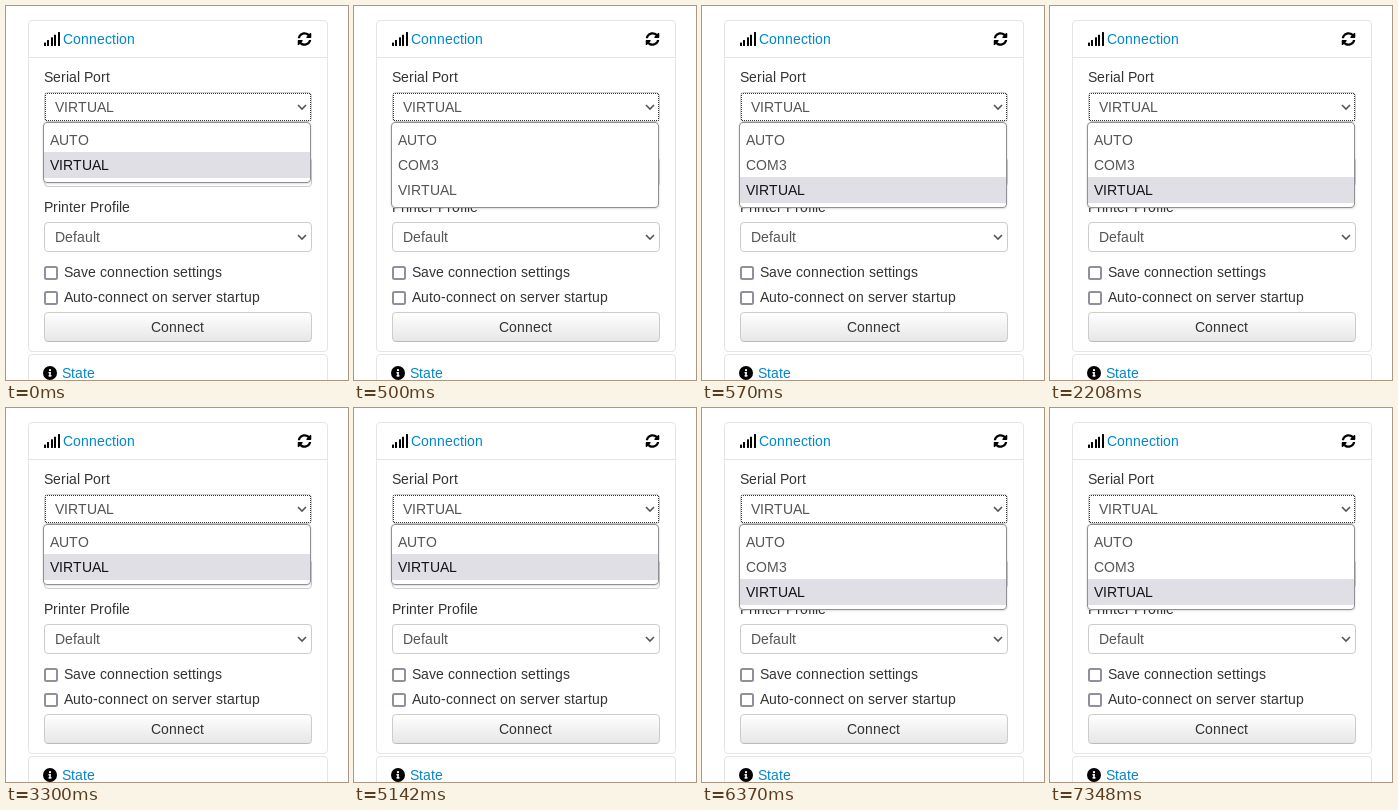
An HTML page with a canvas that plays this animation: 342x374 px, repeating every 8000 ms.

```html
<!DOCTYPE html>
<html lang="en">
<head>
<meta charset="utf-8">
<title>Connection panel</title>
<style>
  html, body { margin: 0; width: 100%; height: 100%; overflow: hidden; background: #fff; }
  canvas { display: block; width: 342px; height: 374px; }
</style>
</head>
<body>
<canvas id="stage"></canvas>
<script>
const W = 342, H = 374, LOOP = 8000;
const canvas = document.getElementById('stage');
const ctx = canvas.getContext('2d', { alpha: false });
const ratio = window.devicePixelRatio || 1;
canvas.width = W * ratio;
canvas.height = H * ratio;

const SHORT = ['AUTO', 'VIRTUAL'];
const LONG = ['AUTO', 'COM3', 'VIRTUAL'];
const STATES = [
  { from: 0, ports: SHORT, active: 1 },
  { from: 500, ports: LONG, active: -1 },
  { from: 570, ports: LONG, active: 2 },
  { from: 3300, ports: SHORT, active: 1 },
  { from: 6370, ports: LONG, active: 2 }
];

// Half of the refresh icon on a 512 unit grid; the other half is turned by 180 degrees.
const ARROW = new Path2D('M371 133C339 104 299 88 256 88C178 88 112 141 93 215C92 220 87 224 81 224' +
  'H24C17 224 11 217 12 210C34 95 135 8 256 8C322 8 383 34 427 77L463 41C478 26 504 37 504 58' +
  'V192C504 205 493 216 480 216H346C325 216 314 190 329 175Z');

const advance = ch => Math.round(ctx.measureText(ch).width);

// Hinted text: every glyph advances by a whole number of pixels.
function text(str, x, y, color = '#333') {
  ctx.fillStyle = color;
  for (const ch of str) {
    ctx.fillText(ch, x, y);
    x += advance(ch);
  }
}

function centeredText(str, x, y) {
  const width = [...str].reduce((sum, ch) => sum + advance(ch), 0);
  text(str, Math.round(x - width / 2), y);
}

function box(x, y, w, h, r, fill, stroke, line = 1) {
  const half = line / 2;
  ctx.beginPath();
  ctx.roundRect(x + half, y + half, w - line, h - line, r - half);
  ctx.fillStyle = fill;
  ctx.fill();
  ctx.strokeStyle = stroke;
  ctx.lineWidth = line;
  ctx.stroke();
}

function select(y, label, value) {
  text(label, 38, y - 10);
  box(38, y, 268, 30, 4, '#fff', '#ccc');
  text(value, 49, y + 20, '#555');
  ctx.beginPath();
  ctx.moveTo(292, y + 13);
  ctx.lineTo(296, y + 17);
  ctx.lineTo(300, y + 13);
  ctx.strokeStyle = '#555';
  ctx.lineWidth = 1.6;
  ctx.stroke();
}

function focusRing(y) {
  ctx.setLineDash([1, 1]);
  ctx.lineDashOffset = 0.5;
  ctx.strokeStyle = '#333';
  ctx.lineWidth = 1;
  ctx.strokeRect(39.5, y + 1.5, 265, 27);
  ctx.setLineDash([]);
}

function checkbox(y, label) {
  box(38, y, 14, 14, 2.5, '#fff', '#8f8f9d', 2);
  text(label, 58, y + 11);
}

function button(y, label) {
  const face = ctx.createLinearGradient(0, y, 0, y + 30);
  face.addColorStop(0, '#fff');
  face.addColorStop(1, '#e6e6e6');
  const edge = ctx.createLinearGradient(0, y, 0, y + 30);
  edge.addColorStop(0, '#ccc');
  edge.addColorStop(0.93, '#ccc');
  edge.addColorStop(1, '#b3b3b3');
  box(38, y, 268, 30, 4, face, edge);
  centeredText(label, 171.5, y + 20);
}

function signalIcon(x, bottom) {
  ctx.fillStyle = '#000';
  ctx.beginPath();
  for (let i = 0; i < 5; i++) {
    const h = 3.5 + i * 2.625;
    ctx.roundRect(Math.round(x + 0.66 + i * 3.5), bottom - h, 2, h, 0.4);
  }
  ctx.fill();
}

function onIconGrid(x, y, draw) {
  ctx.save();
  ctx.translate(x, y);
  ctx.scale(14 / 512, 14 / 512);
  draw();
  ctx.restore();
}

function refreshIcon(x, y) {
  onIconGrid(x, y, () => {
    ctx.fillStyle = '#000';
    ctx.fill(ARROW);
    ctx.translate(512, 512);
    ctx.rotate(Math.PI);
    ctx.fill(ARROW);
  });
}

function infoIcon(x, y) {
  onIconGrid(x, y, () => {
    const disc = (cy, r, color) => {
      ctx.fillStyle = color;
      ctx.beginPath();
      ctx.arc(256, cy, r, 0, Math.PI * 2);
      ctx.fill();
    };
    disc(256, 256, '#000');
    disc(152, 42, '#fff');
    ctx.fillRect(200, 224, 84, 48);
    ctx.fillRect(228, 224, 56, 160);
    ctx.fillRect(200, 336, 112, 48);
  });
}

function dropdown({ ports, active }) {
  const top = 116, row = 25;
  const height = ports.length * row + 11;
  ctx.save();
  ctx.shadowColor = 'rgba(0,0,0,0.2)';
  ctx.shadowBlur = 2 * ratio;
  ctx.shadowOffsetY = 0.5 * ratio;
  ctx.beginPath();
  ctx.roundRect(37, top, 268, height, 4);
  ctx.fillStyle = '#fff';
  ctx.fill();
  ctx.restore();
  box(37, top, 268, height, 4, '#fff', '#8f8f94');
  ports.forEach((port, i) => {
    const y = top + 5 + i * row;
    if (i === active) {
      ctx.fillStyle = '#e0dfe6';
      ctx.fillRect(38, y, 266, row + 1);
    }
    text(port, 44, y + 18, i === active ? '#15141a' : '#555');
  });
}

function render(time) {
  const state = STATES.findLast(s => s.from <= time);
  ctx.setTransform(ratio, 0, 0, ratio, 0, 0);
  ctx.font = '14px "Liberation Sans", Arial, sans-serif';
  ctx.fillStyle = '#fff';
  ctx.fillRect(0, 0, W, H);

  box(22, 14, 300, 332, 4, '#fff', '#e5e5e5');
  ctx.fillStyle = '#e5e5e5';
  ctx.fillRect(22, 51, 300, 1);
  signalIcon(37, 40);
  text('Connection', 57, 38, '#08c');
  refreshIcon(291.5, 26);

  select(86, 'Serial Port', 'VIRTUAL');
  focusRing(86);
  select(151, 'Baudrate', 'AUTO');
  select(216, 'Printer Profile', 'Default');
  checkbox(260, 'Save connection settings');
  checkbox(285, 'Auto-connect on server startup');
  button(306, 'Connect');

  box(22, 348, 300, 60, 4, '#fff', '#e5e5e5');
  infoIcon(37, 360);
  text('State', 56, 372, '#08c');

  dropdown(state);
}

let start;
function tick(now) {
  start ??= now;
  render((now - start) % LOOP);
  requestAnimationFrame(tick);
}
render(0);
requestAnimationFrame(tick);
</script>
</body>
</html>
```
